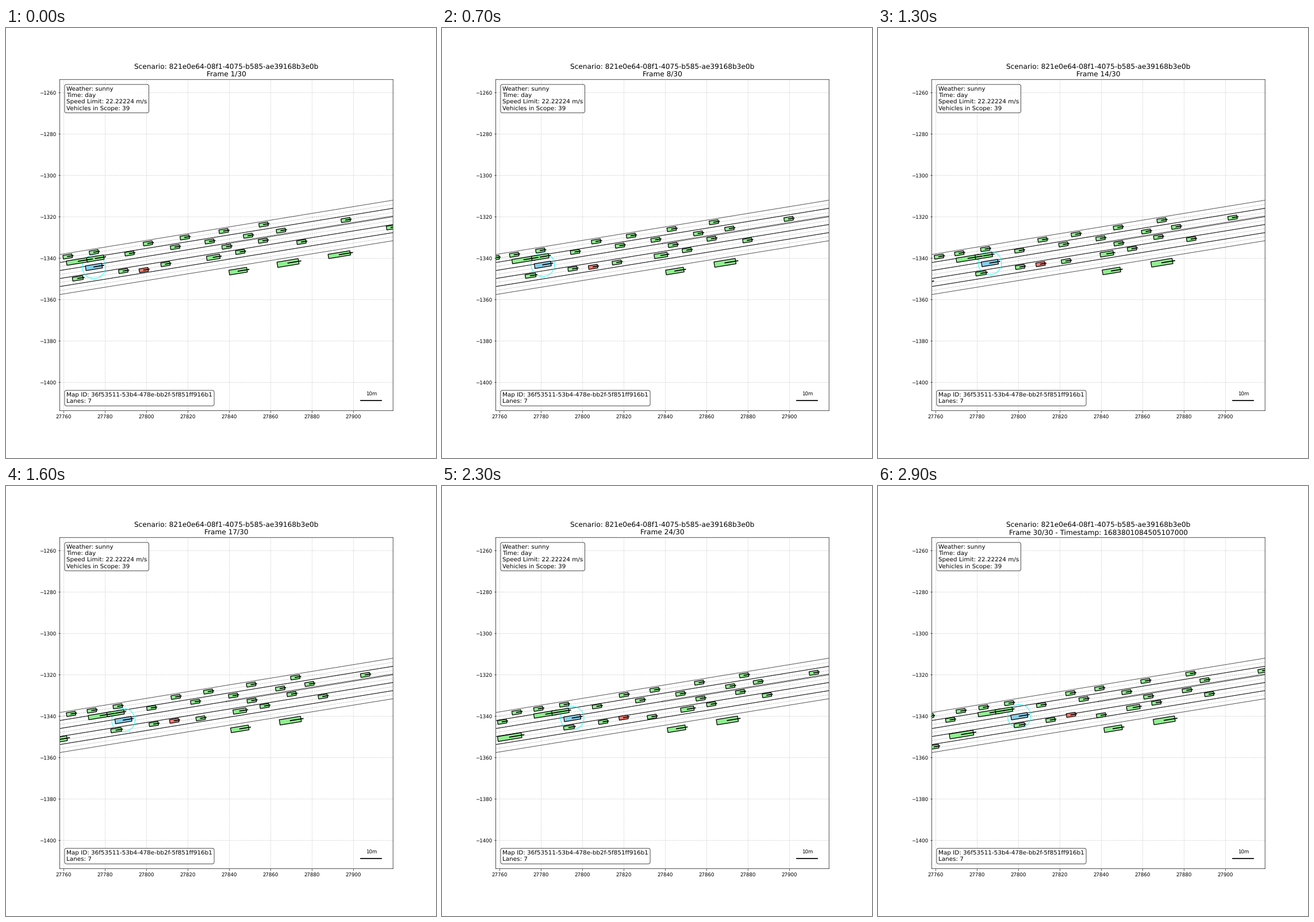
These frames come from a looping animation (748x748 px, 3 s). A matplotlib script:

```python
import math

import matplotlib.pyplot as plt
import numpy as np
from matplotlib.animation import FuncAnimation
from matplotlib.patches import Circle, Polygon

plt.rcParams["text.hinting"] = "none"

STAGE = 748
COUNT, STEP = 30, 0.1               # frames and seconds per frame
CX, CY, HALF = 27838.62, -1333.7, 80   # map window, metres
HALF_X = HALF * 0.775 / 0.77
WEST = CX - HALF_X

# the road runs straight; distances s are metres east of the window's edge
SLOPE = 0.163
HEADING = math.atan(SLOPE)
ROAD_TOP = -1338.22
LANES = 5

fig, ax = plt.subplots(figsize=(12, 12), dpi=STAGE / 12)


def border(k, s):
    """Height of the k-th lane border, counted from the north."""
    return ROAD_TOP + SLOPE * s - k * (3.87 + 0.0003 * s)


def lane_centre(lane, s):
    """Height at which vehicles drive; lane may be fractional."""
    return ROAD_TOP + SLOPE * s - 1.58 - 3.8 * lane


# ---- static scene ----
ax.set_xlim(WEST, CX + HALF_X)
ax.set_ylim(CY - HALF, CY + HALF)
ax.set_xticks(range(27760, 27901, 20))
ax.set_yticks(range(-1400, -1259, 20))
ax.ticklabel_format(useOffset=False, style="plain")
ax.set_axisbelow(True)
ax.grid(True, linestyle="--", alpha=0.6)
for spine in ax.spines.values():
    spine.set_snap(False)


def road_line(k, start=0, end=2 * HALF_X, shift=0, **style):
    s = np.array([start, end])
    ax.plot(WEST + s, border(k, s) + shift, **style)


SOLID = dict(color="black", lw=1.1, alpha=0.7, zorder=2)
DASHED = dict(color="gray", lw=0.8, alpha=0.6, ls="--", zorder=1.9)
SPLIT = 80.5   # from here the two sides of one border lie apart

for k in range(LANES + 1):
    sides = 1 if k in (0, LANES) else 2
    for side in range(sides):
        if k == 2:
            road_line(k, end=SPLIT, **SOLID)
            road_line(k, start=SPLIT, shift=0.4 * side - 0.2, **SOLID)
        else:
            road_line(k, **SOLID)
    if k < LANES:
        road_line(k + 0.5, **DASHED)

BOX = dict(boxstyle="round", facecolor="white", alpha=0.8)


def info(y, va, text):
    ax.text(0.02, y, text, transform=ax.transAxes, fontsize=12, va=va,
            bbox=BOX, zorder=20)


info(0.98, "top", "Weather: sunny\nTime: day\n"
     "Speed Limit: 22.22224 m/s\nVehicles in Scope: 39")
info(0.02, "bottom", "Map ID: 36f53511-53b4-478e-bb2f-5f851ff916b1\nLanes: 7")

bar_x, bar_y = CX + HALF - 5, CY - HALF + 5
ax.plot([bar_x - 10, bar_x], [bar_y, bar_y], color="black", lw=2)
ax.text(bar_x - 5, bar_y + 2, "10m", ha="center", va="bottom", fontsize=10)
title = ax.set_title("", fontsize=14)


# ---- vehicles ----
class Vehicle:
    """Drives along a lane and may drift towards another one."""

    def __init__(self, lane, start, speed, accel=0, size=(4.4, 1.8),
                 color="lightgreen", to_lane=None, until=COUNT):
        self.lanes = lane, lane if to_lane is None else to_lane
        self.start, self.speed, self.accel = start, speed, accel
        self.until = until
        length, width = size
        c, s = math.cos(HEADING), math.sin(HEADING)
        unit = np.array([(-1, -1), (1, -1), (1, 1), (-1, 1)]) / 2
        self.shape = unit * size @ np.array([(c, s), (-s, c)])
        self.nose = np.array([c, s]) * length * 0.6
        self.body = ax.add_patch(Polygon(
            self.shape, closed=True, facecolor=color, edgecolor="black",
            lw=1.5, zorder=5))
        self.arrow, = ax.plot([], [], color="black", lw=2, zorder=6)

    def place(self, n):
        t = n * STEP
        s = self.start + self.speed * t + self.accel * t * t / 2
        lane = np.interp(n, [0, COUNT - 1], self.lanes)
        pos = np.array([WEST + s, lane_centre(lane, s)])
        self.body.set_xy(self.shape + pos)
        self.arrow.set_data(*zip(pos, pos + self.nose))
        for part in (self.body, self.arrow):
            part.set_visible(n < self.until)
        return pos


# lane: start, speed and sometimes acceleration of each car
TRAFFIC = {
    0: [(-21.3, 6.9), (-5.1, 6.6), (3.8, 7.3), (16.5, 7.2), (42.6, 8.4),
        (60.4, 7.1), (79.2, 8.3), (98.5, 10.1, -0.66)],
    0.9: [(-19.2, 9.7), (33.7, 6.6)],
    1.03: [(55.7, 6.1), (72.4, 6.7, 0.53)],
    1.13: [(106.9, 8.6), (138.2, 3.9, 2.47)],
    2.05: [(80.6, 6.75, 1.06), (98.2, 8.65)],
    3: [(30.7, 9.2), (87.2, 7.35), (116.8, 7.1, -0.79)],
    4: [(-31, 11.1)],
}
SHOULDER = 5.4

vehicles = [Vehicle(lane, *car) for lane, cars in TRAFFIC.items()
            for car in cars]
vehicles += [
    Vehicle(1.1, 91, 9.7, until=27),
    Vehicle(3, 160.1, 8.3, until=3),
    Vehicle(3, 51.1, 10.6, to_lane=3.45),
    Vehicle(3, 8.7, 11.6, size=(5.1, 1.8)),
    Vehicle(3.13, 74.2, 8, size=(6.4, 2.1)),
    Vehicle(0.83, 9, 6.6, size=(11.5, 2.1)),
    Vehicle(0.83, 17.2, 6.1, size=(8.3, 2.1)),
    Vehicle(3, -22.6, 12.75, size=(11.6, 2.4)),
    Vehicle(SHOULDER, 86.2, 0.5, size=(8.7, 2.3)),
    Vehicle(SHOULDER, 110.3, 0.7, size=(10.4, 2.6)),
    Vehicle(SHOULDER, 135.1, 0, size=(10.7, 2.1), until=2),
    Vehicle(3.3, 40.6, 9.2, color="salmon", to_lane=2.77),
]
ego = Vehicle(1.87, 16.5, 8.9, size=(8, 2.3), color="skyblue")
halo = ax.add_patch(Circle((0, 0), 5.65, fill=False, edgecolor="cyan",
                           lw=1.5, alpha=0.7, zorder=4))


def draw(n):
    for vehicle in vehicles:
        vehicle.place(n)
    halo.center = ego.place(n)
    text = f"Scenario: 821e0e64-08f1-4075-b585-ae39168b3e0b\nFrame {n + 1}/{COUNT}"
    if n == COUNT - 1:
        text += " - Timestamp: 1683801084505107000"
    title.set_text(text)
    return []


anim = FuncAnimation(fig, draw, frames=COUNT, interval=1000 * STEP, repeat=True)
plt.show()
```
